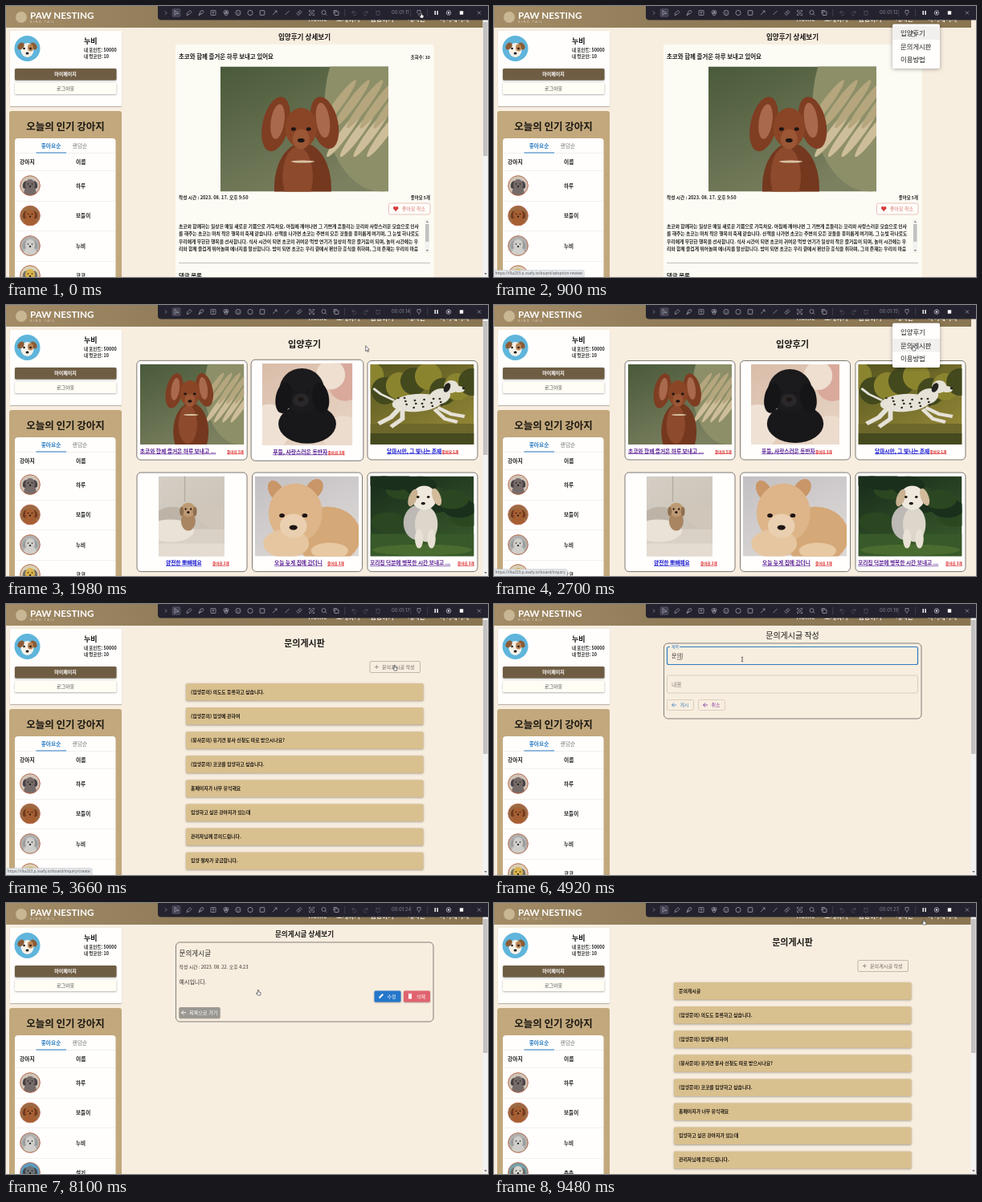
Write an HTML page with a canvas that moves like this. It is 600 by 338 pixels and loops after 9.54 s.

```html
<!DOCTYPE html>
<html lang="ko">
<head>
<meta charset="utf-8">
<style>
html, body { margin: 0; width: 100%; height: 100%; overflow: hidden; background: #f8eee0; }
canvas { display: block; width: 600px; height: 338px; }
</style>
</head>
<body>
<canvas id="stage"></canvas>
<script>
const LOOP = 9540;
const KR = '"Noto Sans CJK KR", "Noto Sans CJK", sans-serif';
const canvas = document.getElementById('stage');
const c = canvas.getContext('2d');
const dpr = Math.max(1, window.devicePixelRatio || 1);
canvas.width = 600 * dpr;
canvas.height = 338 * dpr;

const clamp = u => Math.max(0, Math.min(1, u));
const ease = u => u * u * (3 - 2 * u);
const within = (t, a, b) => t >= a && t < b;

// ---------- drawing helpers ----------
function rect(x, y, w, h, fill) {
  c.fillStyle = fill;
  c.fillRect(x, y, w, h);
}

function box(x, y, w, h, r, fill, stroke, lw = 1, shadow = 0) {
  c.save();
  c.beginPath();
  c.roundRect(x, y, w, h, r);
  if (shadow) {
    c.shadowColor = 'rgba(0,0,0,.35)';
    c.shadowBlur = shadow * dpr;
    c.shadowOffsetY = 0.8 * dpr;
  }
  if (fill) { c.fillStyle = fill; c.fill(); }
  c.shadowColor = 'transparent';
  if (stroke) { c.strokeStyle = stroke; c.lineWidth = lw; c.stroke(); }
  c.restore();
}

function text(s, x, y, size, color = '#222', weight = 400, align = 'left', family = KR) {
  c.font = `${weight} ${size}px ${family}`;
  c.textAlign = align;
  c.textBaseline = 'middle';
  c.fillStyle = color;
  c.fillText(s, x, y);
  return c.measureText(s).width;
}

function link(s, x, y, size, color) {
  const w = text(s, x, y, size, color, 700);
  rect(x, y + size * 0.5, w, 0.7, color);
}

function path(points, color, lw = 0.7, fill) {
  c.beginPath();
  for (let i = 0; i < points.length; i += 2) c.lineTo(points[i], points[i + 1]);
  if (fill) { c.closePath(); c.fillStyle = fill; c.fill(); }
  if (color) { c.strokeStyle = color; c.lineWidth = lw; c.stroke(); }
}

function oval(color, x, y, rx, ry = rx, turn = 0) {
  c.beginPath();
  c.ellipse(x, y, rx, ry, turn, 0, 7);
  c.fillStyle = color;
  c.fill();
}

function ring(x, y, r, color, lw = 0.7) {
  c.beginPath();
  c.arc(x, y, r, 0, 7);
  c.strokeStyle = color;
  c.lineWidth = lw;
  c.stroke();
}

function backArrow(x, y, color) {
  path([x + 5.5, y, x, y], color, 0.9);
  path([x + 2.6, y - 2.6, x, y, x + 2.6, y + 2.6], color, 0.9);
}

// ---------- pictures: flat shapes in a 100 x 100 space ----------
function face(x, y, gap, nose, size) {
  oval('#1c1512', x - gap, y, size);
  oval('#1c1512', x + gap, y, size);
  oval('#1c1512', x, y + nose, size * 1.5, size * 1.2);
}

const pictures = {
  brown(lift = 0) {
    oval('#8d8f68', 96, 30, 34, 70);
    for (let i = 0; i < 9; i++) {
      oval(i % 2 ? '#cdbd98' : '#b5a67e', 70 + i * 4, 30 + (i * 23) % 46, 2.8, 22, 0.5);
    }
    c.translate(0, -lift);
    oval('#74381f', 49, 97, 17, 36);
    oval('#8d4a2c', 46, 88, 9, 24);
    oval('#7f3d22', 33, 46, 8, 22, 0.15);
    oval('#7f3d22', 62, 45, 8, 21, -0.15);
    oval('#a9694c', 34, 44, 4, 14, 0.1);
    oval('#a9694c', 61, 43, 4, 14, -0.1);
    oval('#8a4526', 48, 49, 9.5, 16);
    oval('#9b5735', 48, 58, 5, 8);
    face(48, 50, 4.5, 9, 1.4);
    oval('#d9c3a4', 49, 76, 7, 1);
  },
  black() {
    oval('#d9aa9c', 92, 20, 20, 26);
    oval('#eedfd0', 76, 14, 16, 18);
    oval('#efe2d5', 8, 78, 24, 28);
    oval('#ecdccd', 90, 88, 22, 24);
    oval('#181719', 50, 74, 32, 24);
    oval('#1b1a1c', 44, 33, 25, 27);
    oval('#151416', 24, 42, 9, 19, 0.15);
    oval('#151416', 65, 42, 9, 19, -0.15);
    oval('#29272a', 43, 45, 9, 8);
    face(43, 35, 8, 9, 2);
  },
  spotted() {
    for (let i = 0; i < 8; i++) oval(i % 2 ? '#43491d' : '#8b842f', i * 14, 14 + (i * 19) % 25, 13, 17);
    rect(0, 74, 100, 26, '#6d672a');
    rect(0, 86, 100, 14, '#464a1f');
    const coat = '#e6e2d8';
    path([23, 45, 10, 37, 3, 30], coat, 2.5);
    path([28, 55, 20, 66, 8, 74], coat, 5);
    path([31, 57, 31, 68, 20, 78], coat, 4.5);
    path([65, 54, 78, 62, 91, 65], coat, 4);
    path([62, 56, 72, 68, 84, 72], coat, 4);
    oval(coat, 45, 48, 24, 11, -0.1);
    oval(coat, 67, 40, 11, 9, -0.7);
    oval(coat, 78, 28, 7, 8, 0.2);
    oval(coat, 85, 31, 6, 4, 0.2);
    oval('#24231f', 74, 29, 3, 6, 0.3);
    oval('#24231f', 90, 30, 1.4);
    for (let i = 0; i < 16; i++) oval('#34322e', 27 + (i * 17) % 43, 42 + (i * 7) % 13, 1.1, 1.3);
  },
  room() {
    rect(0, 66, 100, 34, '#d9d1c5');
    oval('#bdb4a7', 14, 52, 26, 13, -0.2);
    oval('#e9e2d7', 18, 68, 36, 14);
    oval('#d0c7ba', 86, 50, 28, 16, 0.2);
    rect(39, 0, 1.5, 32, '#b1a99f');
    rect(0, 84, 100, 16, '#e4dcd1');
    oval('#a98561', 45, 56, 11, 12);
    oval('#bd9a73', 45, 42, 11, 9);
    oval('#90704f', 35, 44, 3, 6);
    oval('#90704f', 55, 44, 3, 6);
    face(45, 41, 4, 4, 1.3);
  },
  fluffy() {
    oval('#d5a878', 70, 74, 32, 36);
    oval('#c99667', 20, 18, 7, 13, -0.3);
    oval('#c99667', 57, 16, 8, 13, 0.35);
    oval('#ddb589', 39, 46, 26, 37);
    oval('#e5c6a0', 30, 84, 22, 18);
    oval('#ead0b0', 37, 62, 13, 15);
    face(37, 49, 11, 15, 2.6);
    oval('#e7c9a3', 72, 93, 18, 10);
  },
  puppy() {
    for (let i = 0; i < 10; i++) oval(i % 2 ? '#2b4722' : '#1a301c', (i * 31) % 100, (i * 17) % 62, 16, 12);
    rect(0, 72, 100, 28, '#38592a');
    oval('#4a6c30', 50, 92, 48, 7);
    oval('#bdb9b4', 46, 58, 14, 22);
    oval('#ddd6ca', 54, 60, 11, 22);
    oval('#e8e1d5', 47, 78, 4, 12);
    oval('#e8e1d5', 59, 78, 4, 12);
    oval('#efe8dc', 52, 27, 12, 15);
    oval('#c9b292', 41, 27, 4, 11, 0.25);
    oval('#d3bc9b', 64, 26, 4, 11, -0.25);
    face(51, 26, 5, 8, 1.4);
  }
};
const backdrops = {
  brown: ['#495a3a', '#7b8060'], black: ['#d9bda9', '#e6d2c2'], spotted: ['#55551f', '#928536'],
  room: ['#d5cec4', '#c8c0b5'], fluffy: ['#c3c0c3', '#dcd7d6'], puppy: ['#182b1b', '#36562a']
};

function picture(name, x, y, w, h, arg) {
  c.save();
  c.beginPath();
  c.rect(x, y, w, h);
  c.clip();
  c.translate(x, y);
  c.scale(w / 100, h / 100);
  const g = c.createLinearGradient(0, 0, 60, 100);
  backdrops[name].forEach((col, i) => g.addColorStop(i, col));
  rect(0, 0, 100, 100, g);
  pictures[name](arg);
  c.restore();
}

function avatar(y, back, coat, ear) {
  c.save();
  c.beginPath();
  c.arc(30, y, 12.3, 0, 7);
  c.clip();
  rect(17, y - 13, 26, 26, back);
  oval(coat, 30, y + 10, 8, 10);
  oval(ear, 24, y - 1, 3, 5, 0.3);
  oval(ear, 36, y - 1, 3, 5, -0.3);
  oval(coat, 30, y - 1, 6, 7);
  face(30, y - 2, 2.5, 3, 0.8);
  c.restore();
  ring(30, y, 12.3, '#b9694a', 1);
}

// ---------- page chrome ----------
function header() {
  const g = c.createLinearGradient(0, 0, 593, 0);
  g.addColorStop(0, '#a38c66');
  g.addColorStop(0.35, '#917c5a');
  g.addColorStop(1, '#8a7552');
  rect(0, 0, 594, 27, g);
  oval('#c9b793', 19, 14, 7);
  text('PAW NESTING', 30, 12, 11.7, '#fff', 700, 'left', 'Lato, sans-serif');
  c.letterSpacing = '1.5px';
  text('KIND TAIL', 30, 19.5, 3.8, '#e1d6bf', 400, 'left', 'Lato, sans-serif');
  c.letterSpacing = '0px';
  [['Home', 388], ['소개하기', 426], ['입양하기', 468], ['게시판', 511], ['마이페이지', 558]]
    .forEach(([s, x]) => text(s, x, 15.5, 8, '#f4efe6', 700, 'center'));
}

function sidebar(fourth) {
  box(5, 31, 139, 94, 1, '#fffefd', null, 1, 1);
  oval('#5fb5db', 26.5, 53, 16);
  oval('#f5f1e8', 26.5, 55, 8, 9);
  oval('#8b5b35', 18.5, 50, 3.5, 5, 0.7);
  oval('#8b5b35', 34.5, 50, 3.5, 5, -0.7);
  oval('#b98552', 30.5, 52, 3.5, 4.5);
  face(26.5, 53, 4, 6, 1.3);
  text('누비', 97, 44, 9, '#111', 700);
  text('내 포인트: 50000', 97, 54.5, 5.5, '#222', 700);
  text('내 멍코인: 10', 97, 62.5, 5.5, '#222', 700);
  box(11, 78, 126.5, 14.5, 1.5, '#6f5d43', null, 1, 2);
  text('마이페이지', 74, 85, 6, '#fff', 700, 'center');
  box(11, 96, 126.5, 14, 1.5, '#fffdf4', null, 1, 2);
  text('로그아웃', 74, 103, 6, '#444', 500, 'center');

  box(4, 131, 140, 220, 3, '#c2a87c');
  text('오늘의 인기 강아지', 74, 150.5, 12.5, '#1b1712', 700, 'center');
  box(11, 165, 125.5, 190, 4, '#fffefd');
  text('좋아요순', 56, 174, 6.7, '#2b7dc4', 700, 'center');
  text('랜덤순', 92, 174, 6.7, '#777', 400, 'center');
  rect(11, 183.4, 125.5, 0.5, '#e4e1dc');
  rect(37.5, 182.5, 37.5, 1, '#2b7dc4');
  text('강아지', 17, 194.5, 6.8, '#222', 700);
  text('이름', 87, 194.5, 6.8, '#222', 700);
  [205.5, 243, 280.5, 318].forEach(y => rect(11, y, 125.5, 0.5, '#e4e1dc'));
  const [name, back, coat, ear] = fourth;
  avatar(224, '#cfc3b7', '#756b69', '#494144');
  avatar(261.5, '#9a6b45', '#a65f33', '#763a1e');
  avatar(299, '#b0b1af', '#cfcecb', '#9b9c9c');
  avatar(336, back, coat, ear);
  ['하루', '보들이', '누비', name].forEach((s, i) => text(s, 87, 224.5 + i * 37.4, 6.6, '#222', 700));
}

function scrollbar() {
  rect(593.5, 0, 6.5, 338, '#f3f2f1');
  rect(594, 20, 5.5, 167, '#c3c1bf');
  path([595.3, 333, 598.7, 333, 597, 335.2], null, 0, '#666');
}

function recorder(t) {
  box(189, -4, 415, 21.5, 4, '#23222e');
  const ink = '#a9a8b2', dim = '#504f5c';
  const at = (x, fn) => { c.save(); c.translate(x, 8.5); fn(); c.restore(); };
  at(199, () => path([-1, -2, 1, 0, -1, 2], ink));
  box(206.5, 3, 11, 11, 2, '#454456');
  at(212, () => path([-2, -3, -2, 3, 0, 1, 3, 1, -2, -3], ink));
  at(228, () => path([-3, 3, -2, 0, 1, -3, 3, -1, 0, 2, -3, 3], ink));
  at(243, () => path([-3, 3, -1, -2, 2, -3, 3, -1, 1, 1, -3, 3, 0, 0], ink));
  at(258, () => { box(-3, -3, 6, 6, 0.5, null, ink, 0.7); path([-1.5, -1, 1.5, -1], ink); path([0, -1, 0, 2], ink); });
  at(274, () => { ring(-1, -1, 2, ink); ring(1.2, -1, 1.8, ink); ring(0, 1.2, 2, ink); });
  at(289, () => { ring(0, 0, 3.2, ink); oval(ink, -1.2, -0.8, 0.5); oval(ink, 1.2, -0.8, 0.5); path([-1.5, 1, 0, 1.7, 1.5, 1], ink, 0.6); });
  at(304, () => ring(0, 0, 3.1, ink));
  at(319, () => box(-2.8, -2.8, 5.6, 5.6, 0.5, null, ink, 0.8));
  at(334.5, () => { path([-2.5, 2.5, 2.5, -2.5], ink); path([0, -2.5, 2.5, -2.5, 2.5, 0], ink); });
  at(350, () => path([-2.5, 2.5, 2.5, -2.5], ink));
  at(365, () => { path([-3, 1, 1, -3, 3, -1, -1, 3, -3, 1], ink); path([-1, -1, 1, 1], ink); });
  at(380.5, () => { ring(0, 0, 1.4, ink); path([-3, -1, -3, -3, -1, -3], ink); path([3, 1, 3, 3, 1, 3], ink); path([1, -3, 3, -3, 3, -1], ink); path([-1, 3, -3, 3, -3, 1], ink); });
  at(396, () => { ring(-0.5, -0.5, 2.5, ink); path([1.4, 1.4, 3.2, 3.2], ink); });
  at(411, () => { box(-2, -1.5, 5, 4.5, 0.5, null, ink, 0.8); path([-3, 1, -3, -3, 1, -3], ink); });
  rect(421.5, 4, 0.6, 9, dim);
  at(433, () => path([0, -3, -2.5, -1, 0, 1, -2.5, -1, 2, -1, 3, 1, 2, 3, -1, 3], dim));
  at(448, () => path([0, -3, 2.5, -1, 0, 1, 2.5, -1, -2, -1, -3, 1, -2, 3, 1, 3], dim));
  at(463, () => { path([-3, -2, 3, -2], dim); box(-2, -2, 4, 5, 0.5, null, dim, 0.8); });
  const sec = 11 + Math.floor(t * 0.00169 + 0.1);
  text(`00:01:${sec}`, 480, 8.5, 5.9, '#85848f', 400, 'left', 'Inter, sans-serif');
  rect(503.5, 4, 0.6, 9, dim);
  at(514, () => { path([-2, -3, 2, -3, 2, 0, 0, 2, -2, 0, -2, -3], ink); path([0, 2, 0, 3.5], ink); });
  rect(524.5, 4, 0.6, 9, dim);
  rect(533.5, 6, 1.4, 5, '#fff');
  rect(536.4, 6, 1.4, 5, '#fff');
  ring(551, 8.5, 2.8, '#d2d1d8');
  oval('#d2d1d8', 551, 8.5, 1.3);
  rect(564.8, 6.3, 4.4, 4.4, '#fff');
  at(589, () => { path([-2, -2, 2, 2], ink); path([2, -2, -2, 2], ink); });
}

// ---------- pointer ----------
const moves = [[0, 517, 11], [180, 513, 17], [360, 513, 17], [640, 521, 34], [1060, 521, 34], [1440, 243, 160],
  [1640, 243, 160], [2140, 512, 19], [2360, 512, 19], [2600, 522, 53], [2940, 522, 53], [3360, 484, 79],
  [3940, 484, 79], [4340, 309, 69], [6780, 309, 69], [7100, 234, 126], [7320, 234, 126], [7640, 314, 111],
  [8160, 314, 111], [8460, 240, 137], [8720, 240, 137], [9360, 535, 23], [LOOP, 535, 23]];

function pointerAt(t) {
  const i = moves.findIndex(m => m[0] > t);
  const [t0, x0, y0] = moves[i - 1], [t1, x1, y1] = moves[i];
  const u = (t - t0) / (t1 - t0), e = ease(u);
  return { x: x0 + (x1 - x0) * e, y: y0 + (y1 - y0) * e, travelling: x0 !== x1 && within(u, 0.1, 0.8) };
}

function pointer(t) {
  const p = pointerAt(t);
  c.save();
  c.translate(p.x, p.y);
  if (t > 4250 && t < 6850) {
    path([0, -2.5, 0, 2.5], '#222', 0.7);
    path([-1.2, -2.7, 1.2, -2.7], '#222', 0.6);
    path([-1.2, 2.7, 1.2, 2.7], '#222', 0.6);
  } else if (p.travelling && !overCard(p)) {
    path([0, -2, 0, 5, 1.6, 3.6, 2.7, 6, 3.7, 5.5, 2.7, 3.2, 4.6, 3.1, 0, -2], '#222', 0.6, '#fff');
  } else {
    path([-0.6, -2.5, 0.6, -2.5, 0.8, 0, 3, 0.7, 2.6, 4, -0.8, 4, -2.6, 1.2, -0.8, 1.5, -0.6, -2.5], '#222', 0.6, '#fff');
  }
  c.restore();
}

// ---------- timeline ----------
const GALLERY = 1080, BOARD = 2980, FORM = 3980, POSTED = 7340, POST = 7860, BACK = 8720;
const menus = [{ open: 260, close: 1080, hovers: [540] }, { open: 2240, close: 2980, hovers: [2440, 2520] }];
const openMenu = t => menus.find(m => within(t, m.open, m.close + 100));

// ---------- pages ----------
function title(s, y, size, weight = 700) {
  text(s, 371.5, y, size, '#1c1a17', weight, 'center');
}

function reviewPage() {
  title('입양후기 상세보기', 39, 8.6);
  box(211, 48, 321.5, 310, 3, '#fcfbf4');
  text('초코와 함께 즐거운 하루 보내고 있어요', 215, 63, 7.45, '#1b1b1b', 700);
  text('조회수: 10', 528, 64, 5.4, '#222', 700, 'right');
  picture('brown', 267, 75.5, 209, 156);
  text('작성 시간 : 2023. 08. 17. 오후 9:50', 215, 238.5, 5.7, '#222', 700);
  text('좋아요 5개', 528, 238.5, 5.4, '#222', 700, 'right');
  box(476.5, 246, 51.5, 14, 2, '#fffdfa', '#e3aaa2', 0.7);
  oval('#d73a3a', 483.7, 251.7, 1.8);
  oval('#d73a3a', 486.7, 251.7, 1.8);
  path([482, 252.5, 488.4, 252.5, 485.2, 256.3], null, 0, '#d73a3a');
  text('좋아요 취소', 493, 253, 6, '#d9776e', 500);
  const lines = [
    '초코와 함께하는 일상은 매일 새로운 기쁨으로 가득차요. 아침에 깨어나면 그 기쁘게 흔들리는 꼬리와 사랑스러운 모습으로 인사',
    '를 해주는 초코는 마치 작은 행복의 축제 같습니다. 산책을 나가면 초코는 주변의 모든 것들을 흥미롭게 여기며, 그 눈빛 하나로도',
    '우리에게 무한한 행복을 선사합니다. 식사 시간이 되면 초코의 귀여운 먹방 연기가 일상의 작은 즐거움이 되며, 놀이 시간에는 우',
    '리와 함께 즐겁게 뛰어놀며 에너지를 발산합니다. 밤이 되면 초코는 우리 곁에서 편안한 휴식을 취하며, 그의 존재는 우리의 마음'
  ];
  lines.forEach((s, i) => text(s, 215, 274.5 + i * 9.5, 5.8, '#222', 700));
  rect(521.5, 266, 5.5, 42, '#f1f1ef');
  rect(522, 272, 4.5, 22, '#c1c1c1');
  path([522.8, 270, 525.8, 270, 524.3, 268], null, 0, '#777');
  path([522.8, 304, 525.8, 304, 524.3, 306], null, 0, '#777');
  rect(215, 320, 313, 0.7, '#aaa8a2');
  text('댓글 목록', 215, 336.5, 7.4, '#1b1b1b', 700);
}

const cardX = i => 163 + (i % 3) * 143.5;
const cardY = i => i < 3 ? 69.5 : 209;
const onCard = (p, i) => within(p.x - cardX(i), 0, 137) && within(p.y - cardY(i), 0, 123.5);
const overCard = p => [0, 1, 2, 3, 4, 5].some(i => onCard(p, i));

// A card grows while hovered: the share of the last moments spent on it
function cardScale(i, t) {
  const samples = 16, span = 240;
  let hits = 0;
  for (let k = 0; k < samples; k++) {
    const s = t - k * span / samples;
    if (s > GALLERY && !openMenu(s) && onCard(pointerAt(s), i)) hits++;
  }
  return 1 + 0.03 * ease(hits / samples);
}

function galleryPage(t) {
  title('입양후기', 49, 11.2);
  const fresh = '#1515d0', visited = '#5a1f96';
  // picture, its left edge and width, caption, its left edge and colour, likes and their left edge
  const cards = [
    ['brown', 167, 129, '초코와 함께 즐거운 하루 보내고 ...', 167, visited, 5, 275],
    ['black', 320, 110, '푸들, 사랑스러운 동반자', 333, visited, 3, 400],
    ['spotted', 453.5, 129, '달마시안, 그 빛나는 존재', 474, fresh, 1, 542.5],
    ['room', 190, 82, '얌전한 뽀삐예요', 199, fresh, 2, 257],
    ['fluffy', 310, 129, '오늘 늦게 집에 갔더니', 334, visited, 3, 400],
    ['puppy', 453.5, 129, '꼬리집 덕분에 행복한 시간 보내고 ...', 453, visited, 3, 562]
  ];
  cards.forEach(([name, px, pw, caption, cx, color, likes, lx], i) => {
    const x = cardX(i), y = cardY(i), scale = cardScale(i, t);
    c.save();
    c.translate(x + 68.5, y + 61.75);
    c.scale(scale, scale);
    c.translate(-x - 68.5, -y - 61.75);
    box(x, y, 137, 123.5, 5, '#fffefd', '#5e5a55', 0.8);
    picture(name, px, y + 4.5, pw, 100, 13);
    link(caption, cx, y + 112.5, 6.7, color);
    link(`좋아요 ${likes}개`, lx, y + 113.5, 4.6, '#d92626');
    c.restore();
  });
}

const posts = ['문의게시글', '(입양문의) 의도도 등록하고 싶습니다.', '(입양문의) 입양에 관하여',
  '(봉사문의) 유기견 봉사 신청도 따로 받으시나요?', '(입양문의) 코코를 입양하고 싶습니다.',
  '홈페이지가 너무 유익해요', '입양하고 싶은 강아지가 있는데', '관리자님께 문의드립니다.', '입양 절차가 궁금합니다.'];

function boardPage(first) {
  title('문의게시판', 48.5, 11);
  box(453, 71.5, 62.5, 14, 1.5, null, '#aaa398', 0.7);
  path([458.8, 78.5, 463.8, 78.5], '#777', 0.7);
  path([461.3, 76, 461.3, 81], '#777', 0.7);
  text('문의게시글 작성', 468, 78.5, 6.1, '#6f6a62', 500);
  posts.slice(first, first + 8).forEach((s, i) => {
    const y = 99 + i * 30.1;
    box(224, y, 295.5, 21.5, 1.5, '#d9c08f', null, 1, 2.5);
    text(s, 230, y + 10.5, 5.9, '#1d1a14', 700);
  });
}

// Stages of typing a Hangul string, one keystroke each
const LEADS = 'ㄱㄲㄴㄷㄸㄹㅁㅂㅃㅅㅆㅇㅈㅉㅊㅋㅌㅍㅎ';
function keystrokes(s) {
  const out = [];
  let done = '';
  for (const ch of s) {
    const n = ch.charCodeAt(0) - 0xac00;
    if (n >= 0) {
      const tail = n % 28;
      out.push(done + LEADS[Math.floor(n / 588)]);
      if (tail) out.push(done + String.fromCharCode(0xac00 + n - tail));
    }
    done += ch;
    out.push(done);
  }
  return out;
}
const titleKeys = keystrokes('문의게시글');
const bodyKeys = keystrokes('예시입니다.');

function field(y, label, keys, start, focusAt, blurAt, t) {
  const focus = within(t, focusAt, blurAt);
  const step = Math.min(keys.length - 1, Math.floor((t - start) / 75));
  const value = step < 0 ? '' : keys[step];
  const k = clamp((t - focusAt) / 120);
  const edge = focus ? '#2f7cc0' : value ? '#8d867c' : '#cfc6b9';
  box(215.5, y, 312, 22, 2, null, edge, focus ? 1.2 : 0.8);
  if (k > 0) rect(219, y - 1, 12 * k, 2, '#f8eee0');
  text(label, 221, y + 11 - 11 * k, 6.9 - 1.9 * k, focus ? '#2f7cc0' : '#888078');
  const w = value ? text(value, 221, y + 11, 7, '#38342f') : 0;
  if (value && focus && step < keys.length - 1) rect(221 + w - 6.4, y + 15.3, 6.4, 0.6, '#38342f');
  if (focus) rect(221.5 + w, y + 7.5, 0.5, 7.5, '#38342f');
}

function formPage(t) {
  title('문의게시글 작성', 39, 10, 400);
  box(211.5, 49, 320.5, 94, 5, null, '#66615b', 0.8);
  field(53.5, '제목', titleKeys, 4560, 4400, 5650, t);
  field(89, '내용', bodyKeys, 5860, 5650, 7200, t);
  [[215.5, '게시', '#4c8abf'], [254.5, '취소', '#8a3aa3']].forEach(([x, s, col]) => {
    box(x, 119.5, 33, 13, 2, null, '#cdbfae', 0.7);
    backArrow(x + 6, 126, col);
    text(s, x + 16, 126, 6, col, 500);
  });
}

function postPage() {
  title('문의게시글 상세보기', 39, 8.6);
  box(211.5, 49, 320.5, 99, 5, null, '#66615b', 0.8);
  text('문의게시글', 215.5, 63, 8.6, '#2b2823');
  text('작성 시간 : 2023. 08. 22. 오후 4:23', 215.5, 79.5, 5.9, '#35312b');
  text('예시입니다.', 215.5, 98.5, 7, '#35312b');
  box(458.5, 109.5, 33, 14, 1.5, '#2477cb', null, 1, 2);
  path([464, 119, 464.5, 117, 468.5, 113, 470, 114.5, 466, 118.5], null, 0, '#fff');
  text('수정', 474.5, 116.5, 6, '#fff', 500);
  box(495, 109.5, 33, 14, 1.5, '#e0636f', null, 1, 2);
  rect(501, 114, 4, 5.5, '#fff');
  rect(500.5, 112.8, 5, 0.8, '#fff');
  text('삭제', 511, 116.5, 6, '#fff', 500);
  box(215.5, 130, 51, 13.5, 1.5, '#9b9892', null, 1, 1);
  backArrow(218.5, 136.7, '#fff');
  text('목록으로 가기', 228, 136.7, 6.2, '#fff', 500);
}

function dropdown(menu, t) {
  const hover = menu.hovers.filter(at => t >= at).length - 1;
  c.save();
  c.globalAlpha = Math.min(clamp((t - menu.open) / 120), clamp((menu.close + 100 - t) / 100));
  box(496, 22.5, 59, 55.5, 2, '#fffefd', null, 1, 5);
  ['입양후기', '문의게시판', '이용방법'].forEach((s, i) => {
    if (i === hover) rect(496, 25.5 + i * 16.5, 59, 16.5, '#f1f0ef');
    text(s, 506, 34 + i * 16.4, 8.4, '#222', 500);
  });
  c.restore();
}

function status(s) {
  const url = 'https://i9a203.p.ssafy.io/board/' + s;
  c.font = '4.9px "Open Sans", sans-serif';
  const w = c.measureText(url).width;
  box(-2, 329.5, w + 6, 10, 2, '#e3e6e9', '#bdbfc2', 0.5);
  text(url, 1.5, 334, 4.9, '#555', 400, 'left', '"Open Sans", sans-serif');
}

const links = [[540, 'adoption-review'], [1340, 'adoption-review/228'], [1960, ''], [2520, 'inquiry'],
  [3220, 'inquiry/create'], [4060, ''], [8420, 'inquiry'], [8820, '']];

const dogs = {
  coco: ['코코', '#d9cfb5', '#d9b34c', '#777064'],
  seolgi: ['설기', '#5a9cc1', '#6d7377', '#41484e'],
  chuchu: ['츄츄', '#76a0a8', '#d6d4cd', '#6d6c66']
};

function draw(t) {
  c.setTransform(dpr, 0, 0, dpr, 0, 0);
  rect(0, 0, 600, 338, '#f8eee0');
  header();
  sidebar(t < POST ? dogs.coco : t < BACK ? dogs.seolgi : dogs.chuchu);

  if (t < GALLERY) reviewPage();
  else if (t < BOARD) galleryPage(t);
  else if (t < FORM) boardPage(1);
  else if (t < POSTED) formPage(t);
  else if (within(t, POST, BACK)) postPage();
  else boardPage(0);

  // An open menu locks scrolling, so the scrollbar is gone meanwhile
  const menu = openMenu(t);
  if (menu) dropdown(menu, t);
  else scrollbar();

  const hovered = links.filter(l => t >= l[0]).pop();
  if (hovered && hovered[1]) status(hovered[1]);

  recorder(t);
  pointer(t);
}

const began = performance.now();
function tick() {
  draw((performance.now() - began) % LOOP);
  requestAnimationFrame(tick);
}
tick();
</script>
</body>
</html>
```
